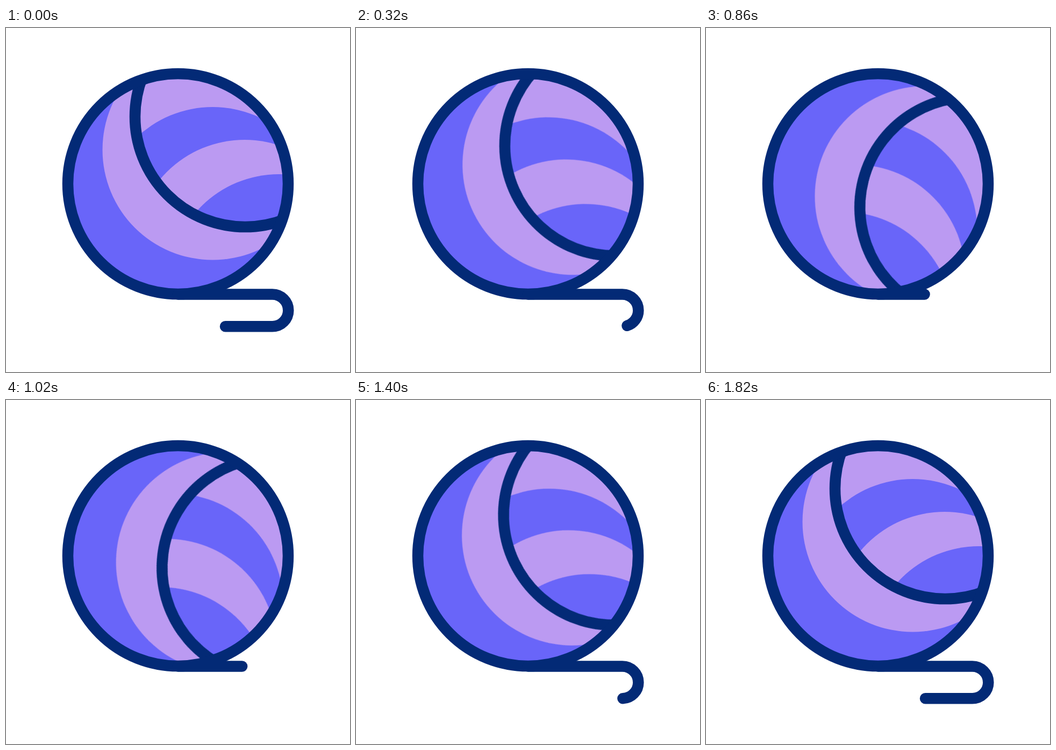
Recreate the animation shown at these times as an HTML page. Size 640 by 640 pixels, loop 2400 ms.

```html
<!DOCTYPE html>
<html lang="en">
<head>
<meta charset="utf-8">
<title>Yarn ball</title>
<style>
  html, body { margin: 0; width: 100%; height: 100%; overflow: hidden; background: #fff; }
  svg { display: block; width: 100%; height: 100%; }
  .blue { fill: #6965f9; }
  .lilac { fill: #bb9af2; }
  .line { fill: none; stroke: #032a76; stroke-width: 20.5; stroke-linecap: round; }
</style>
</head>
<body>
<svg viewBox="0 0 640 640">
  <defs>
    <clipPath id="ball"><circle r="205"/></clipPath>
    <clipPath id="cap"><circle cx="125" cy="-125" r="205"/></clipPath>
  </defs>
  <g transform="translate(320 290)">
    <g clip-path="url(#ball)">
      <g id="wool">
        <circle class="blue" r="210"/>
        <circle class="lilac" cx="64.5" cy="-63.5" r="205"/>
        <g clip-path="url(#cap)">
          <circle class="blue" cx="64.5" cy="62" r="205"/>
          <circle class="lilac" cx="124" cy="123" r="205"/>
          <circle class="blue" cx="188" cy="187" r="205"/>
        </g>
        <circle class="line" cx="125" cy="-125" r="205"/>
      </g>
    </g>
    <circle class="line" r="205"/>
  </g>
  <path id="thread" class="line" d="M320 495.6H495.5A29.8 29.8 0 0 1 495.5 555.2H408"/>
</svg>
<script>
  const LOOP = 2400, TURN = 800, REST = 1820;
  const ANGLE = 60, PULL = 273;

  // Wind up, unwind, then hold until the loop ends.
  function wind(el, from, to) {
    el.animate([
      { ...from, offset: 0, easing: 'cubic-bezier(.33,0,.67,1)' },
      { ...to, offset: TURN / LOOP, easing: 'cubic-bezier(.33,0,.6,1)' },
      { ...from, offset: REST / LOOP },
      { ...from, offset: 1 }
    ], { duration: LOOP, iterations: Infinity });
  }

  const wool = document.getElementById('wool');
  const thread = document.getElementById('thread');
  const length = thread.getTotalLength();
  thread.style.strokeDasharray = `${length} ${length * 2}`;

  wind(wool, { transform: 'rotate(0deg)' }, { transform: `rotate(${ANGLE}deg)` });
  wind(thread, { strokeDashoffset: '0px' }, { strokeDashoffset: `${PULL}px` });
</script>
</body>
</html>
```
